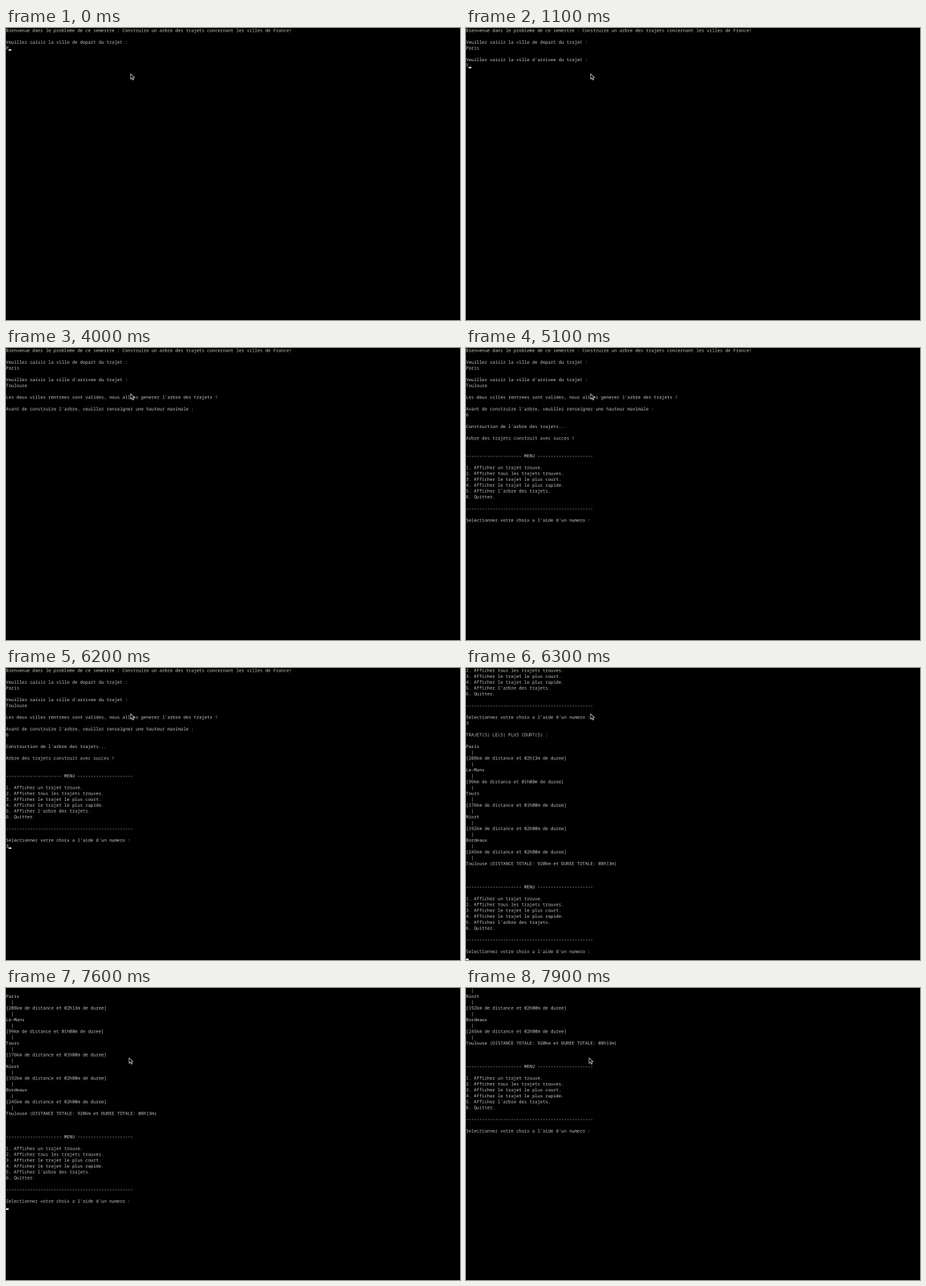
Write an HTML page with a canvas that moves like this. It is 600 px wide and 387 px high and loops after 8000 ms.

```html
<!DOCTYPE html>
<html lang="fr">
<meta charset="utf-8">
<style>
  html, body { margin: 0; width: 100%; height: 100%; overflow: hidden; background: #000; }
  canvas { display: block; }
</style>
<canvas id="screen" width="600" height="387"></canvas>
<script>
const WIDTH = 600, HEIGHT = 387, LOOP = 8000, COL = 3.5, ROW = 7.76, ROWS = 50;
const BASELINE = 5.2, CARET_TOP = 4.95, CARET_HEIGHT = 1.9;

// The terminal is drawn large, then scaled down smoothly onto the stage
const SCALE = 4;
const screen = document.getElementById("screen").getContext("2d");
const buffer = document.createElement("canvas");
buffer.width = WIDTH * SCALE;
buffer.height = HEIGHT * SCALE;
const ctx = buffer.getContext("2d");
ctx.scale(SCALE, SCALE);
screen.imageSmoothingQuality = "high";

const rule = "-".repeat(48), half = "-".repeat(21);
const menu = `${half} MENU ${half}

1. Afficher un trajet trouve.
2. Afficher tous les trajets trouves.
3. Afficher le trajet le plus court.
4. Afficher le trajet le plus rapide.
5. Afficher l'arbre des trajets.
6. Quitter.

${rule}

Selectionnez votre choix a l'aide d'un numero :
`;
const leg = (city, km, time) =>
  `${city}\n  |\n[${km}km de distance et ${time} de duree]\n  |\n`;
const route = leg("Paris", 208, "02h13m") + leg("Le-Mans", 99, "01h00m") +
  leg("Tours", 176, "01h00m") + leg("Niort", 192, "02h00m") + leg("Bordeaux", 245, "02h00m");

// [time, text appended to the terminal]
const output = [
  [0, `Bienvenue dans le probleme de ce semestre : Construire un arbre des trajets concernant les villes de France!

Veuillez saisir la ville de depart du trajet :
P`],
  [100, "a"], [200, "r"], [300, "i"], [400, "s"],
  [500, "\n\nVeuillez saisir la ville d'arrivee du trajet :\n"],
  [1100, "T"], [1200, "o"], [2400, "u"],
  [2800, "lo"], [2900, "u"], [3000, "s"], [3200, "e"],
  [3400, `

Les deux villes rentrees sont valides, nous allons generer l'arbre des trajets !

Avant de construire l'arbre, veuillez renseigner une hauteur maximale :
`],
  [4400, "6"],
  [4600, `

Construction de l'arbre des trajets...

Arbre des trajets construit avec succes !


${menu}`],
  [6200, "3"],
  [6300, `

TRAJET(S) LE(S) PLUS COURT(S) :

${route}Toulouse (DISTANCE TOTALE: 920km et DUREE TOTALE: 08h13m)



${menu}`],
];

// Spans where the blinking caret is hidden
const caretOff = [[800, 1100], [1600, 1900], [2200, 2400], [4000, 4400],
  [5100, 5400], [5800, 6100], [6800, 7200], [7800, LOOP]];

// Extra lines scrolled by the mouse wheel, three at a time
function wheelLines(t) {
  if (t < 7300) return 0;
  if (t < 7400) return 3;
  const step = Math.floor((t - 7400) / 100);
  return 3 * Math.round(2 + 1.2 * step);
}

function drawPointer(x, y) {
  ctx.beginPath();
  [[0, 0], [0, 7], [1.6, 5.6], [2.7, 8.2], [4, 7.6], [2.9, 5.2], [5, 5]]
    .forEach(([dx, dy]) => ctx.lineTo(x + dx, y + dy));
  ctx.closePath();
  ctx.fillStyle = "#000";
  ctx.fill();
  ctx.strokeStyle = "#ddd";
  ctx.lineWidth = 0.7;
  ctx.stroke();
}

function draw(t) {
  const lines = output.filter(([at]) => at <= t).map(([, text]) => text).join("").split("\n");
  const last = lines.length - 1;
  const top = Math.max(0, lines.length - ROWS) + wheelLines(t);

  ctx.fillStyle = "#000";
  ctx.fillRect(0, 0, WIDTH, HEIGHT);

  ctx.fillStyle = "#ccc";
  ctx.font = `${COL / 0.6}px "Noto Sans Mono", monospace`;
  ctx.textRendering = "geometricPrecision";
  lines.slice(top, top + ROWS).forEach((line, row) =>
    ctx.fillText(line, 0, row * ROW + BASELINE));

  if (!caretOff.some(([from, to]) => t >= from && t < to)) {
    ctx.fillStyle = "#f2f2f2";
    ctx.fillRect(lines[last].length * COL, (last - top) * ROW + CARET_TOP, COL, CARET_HEIGHT);
  }

  const move = Math.min(1, Math.max(0, Math.floor((t - 7100) / 100) / 2));
  drawPointer(164.8 - 2 * move, 60.7 + 32 * move);

  screen.drawImage(buffer, 0, 0, WIDTH, HEIGHT);
}

function tick() {
  draw(performance.now() % LOOP);
  requestAnimationFrame(tick);
}
tick();
</script>
</html>
```
